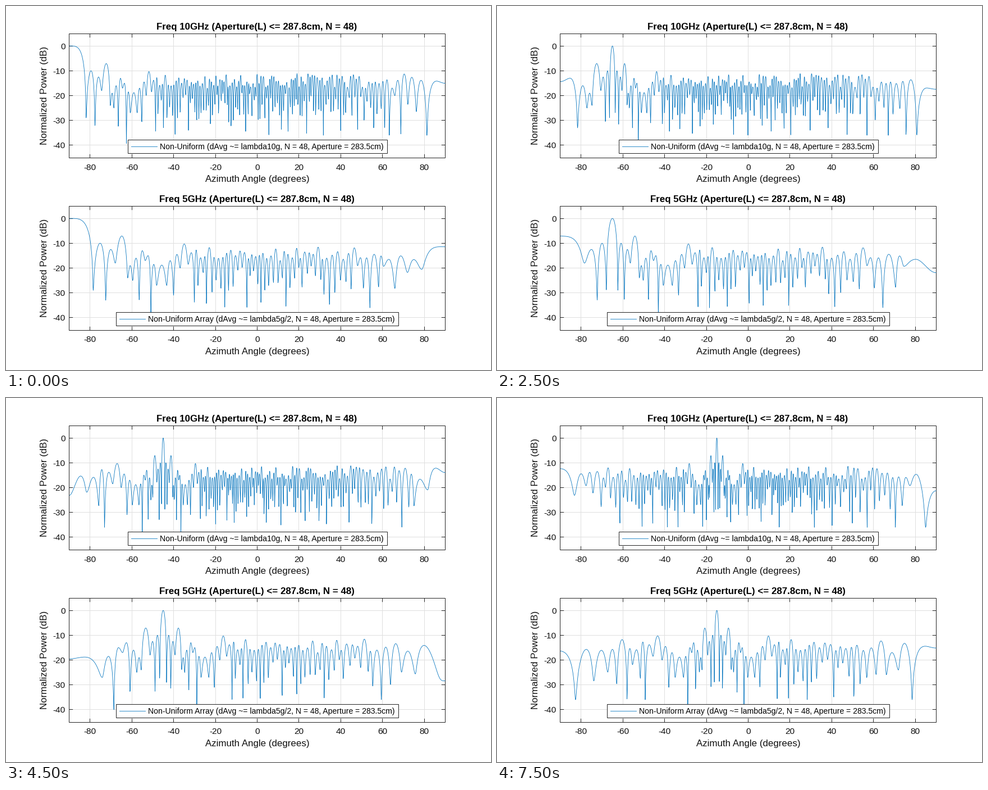
A matplotlib script that plays this animation: 864x648 px, repeating every 8 s.

```python
import math
import random

import numpy as np
import matplotlib.pyplot as plt
from matplotlib.animation import FuncAnimation
from matplotlib.patches import Rectangle

plt.rcParams["font.family"] = "Liberation Sans"
plt.rcParams["path.simplify"] = False

W, H, DPI = 864, 648, 72
BLUE, INK, TEXT, GRID = "#0072BD", "#262626", "#101010", "#dfdfdf"
LEFT, RIGHT = 112.6, 782.2
PANEL_H, DB_TOP, DB_SPAN = 221, 5, 50
MEAN_LOBE = .0165

# Lobes beside the beam over u = |sin(angle) - sin(steering)|:
# (end of lobe, crest dB, closing dip dB).
NEAR = [
    (.0231, -10, -33), (.0366, -12.5, -18), (.0585, -7.1, -24),
    (.0688, -19, -25), (.0832, -16, -33), (.0975, -13, -17),
    (.1120, -15, -40), (.1275, -18.5, -27), (.1572, -18.8, -27),
    (.1785, -17, -31), (.2000, -14.5, -20), (.2275, -10.3, -18.5),
]
# Deep nulls farther out; the lobes between them are random.
NULLS = [.2497, .2945, .3665, .4572, .516, .6194, .7843, .9045, 1.0235,
         1.0975, 1.2015, 1.255, 1.4022, 1.5255, 1.6425, 1.744, 1.8275,
         1.875, 1.8933, 1.9325, 1.9885, 2.0065]


def build_knots():
    rng = random.Random(48)
    u, db = [0, .0100], [0, -29]

    def add(end, crest, dip):
        u.extend([(u[-1] + end) / 2, end])
        db.extend([crest, dip])

    for lobe in NEAR:
        add(*lobe)
    for null in NULLS:
        start = u[-1]
        count = max(1, round((null - start) / MEAN_LOBE))
        step = (null - start) / count
        for k in range(1, count):
            add(start + step * (k + rng.uniform(-.2, .2)),
                rng.uniform(-17, -11), rng.uniform(-31, -19))
        add(null, rng.uniform(-16, -12), -36)
    return np.array(u), 10 ** (np.array(db) / 10)


KNOT_U, KNOT_P = build_knots()
ANGLE = np.linspace(-90, 90, 1801)


def pattern(steer, scale):
    """Power in dB: half-cosine steps between crests and dips."""
    u = scale * np.abs(np.sin(np.radians(ANGLE)) - np.sin(np.radians(steer)))
    i = np.clip(np.searchsorted(KNOT_U, u, side="right") - 1, 0, len(KNOT_U) - 2)
    t = (u - KNOT_U[i]) / (KNOT_U[i + 1] - KNOT_U[i])
    mix = (1 - np.cos(np.pi * t)) / 2
    return 10 * np.log10(KNOT_P[i] + (KNOT_P[i + 1] - KNOT_P[i]) * mix)


def px(angle):
    return LEFT + (angle + 90) * (RIGHT - LEFT) / 180


def py(db, top):
    return top + (DB_TOP - db) * PANEL_H / DB_SPAN


def crisp(v):
    """Centre of the pixel that holds v."""
    return math.floor(v) + .5


fig = plt.figure(figsize=(W / DPI, H / DPI), dpi=DPI, facecolor="white")
ax = fig.add_axes([0, 0, 1, 1])
ax.set_xlim(0, W)
ax.set_ylim(H, 0)
ax.axis("off")


def seg(x, y, color=INK, lw=1, z=2):
    ax.plot(x, y, color=color, lw=lw, zorder=z, snap=False,
            solid_capstyle="butt")


def label(x, y, s, size, color=TEXT, ha="center", **kw):
    ax.text(x, y, s, fontsize=size, color=color, ha=ha, zorder=6, **kw)


def box(x0, y0, x1, y1, z, **kw):
    x0, y0, x1, y1 = map(crisp, (x0, y0, x1, y1))
    patch = Rectangle((x0, y0), x1 - x0, y1 - y0, ec=INK, lw=1, zorder=z,
                      snap=False, **kw)
    ax.add_patch(patch)
    return patch


def panel(top, freq, legend, legend_x):
    bottom, mid, tick = top + PANEL_H, (LEFT + RIGHT) / 2, 6.7
    x_lo, x_hi, y_lo, y_hi = map(crisp, (LEFT, RIGHT, top, bottom))
    for a in range(-80, 81, 20):
        x = crisp(px(a))
        seg([x, x], [y_lo, y_hi], GRID, z=1)
        seg([x, x], [y_lo, y_lo + tick])
        seg([x, x], [y_hi, y_hi - tick])
        label(px(a), bottom + 21.5, str(a), 15.4)
    for d in range(-40, 1, 10):
        y = crisp(py(d, top))
        seg([x_lo, x_hi], [y, y], GRID, z=1)
        seg([x_lo, x_lo + tick], [y, y])
        seg([x_hi, x_hi - tick], [y, y])
        label(105.5, y + 5.2, str(d), 15.4, ha="right")
    frame = box(LEFT, top, RIGHT, bottom, 2, fill=False)

    label(mid - .5, top - 7, f"Freq {freq}GHz (Aperture(L) <= 287.8cm, N = 48)",
          16.9, "black", weight="bold")
    label(mid, bottom + 43, "Azimuth Angle (degrees)", 16.9)
    label(69, top + PANEL_H / 2, "Normalized Power (dB)", 16.9,
          rotation=90, va="center")

    x0, x1 = legend_x
    box(x0, top + 189, x1, top + 213, 4, fc="white")
    y = crisp(top + 201)
    seg([x0 + 6, x0 + 53], [y, y], BLUE, .8, 5)
    label(x0 + 57, y + 4.8, legend, 14, "black", ha="left")

    curve, = ax.plot([], [], color=BLUE, lw=.8, zorder=3)
    curve.set_clip_path(frame)
    return curve


PANELS = [
    (49, 1, panel(49, 10, "Non-Uniform (dAvg ~= lambda10g, N = 48, "
                          "Aperture = 283.5cm)", (217, 679))),
    (356, .5, panel(356, 5, "Non-Uniform Array (dAvg ~= lambda5g/2, N = 48, "
                            "Aperture = 283.5cm)", (196, 699))),
]


def update(n):
    steer = -90 + 5 * n
    for top, scale, curve in PANELS:
        curve.set_data(px(ANGLE), py(pattern(steer, scale), top))
    return [curve for _, _, curve in PANELS]


anim = FuncAnimation(fig, update, frames=16, interval=500, repeat=True,
                     repeat_delay=0, blit=False)
plt.show()
```
